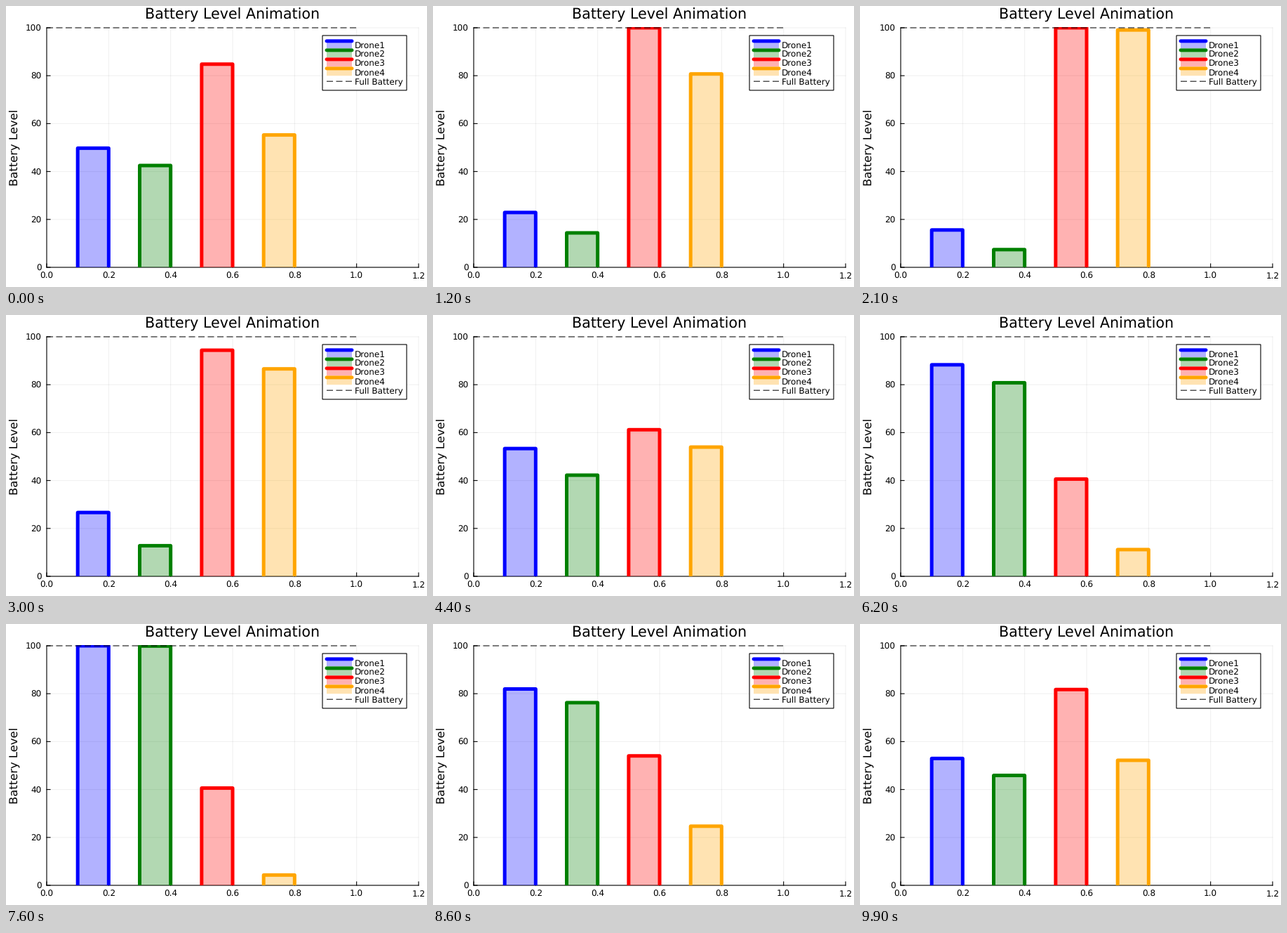
These frames come from a looping animation (600x400 px, 10000 ms). A matplotlib script:

```python
import matplotlib.pyplot as plt
import numpy as np
from matplotlib.animation import FuncAnimation
from matplotlib.patches import Rectangle

plt.rcParams["font.family"] = "DejaVu Sans"
plt.rcParams["text.hinting"] = "none"

W, H, DPI = 600, 400, 100
FRAMES, INTERVAL = 100, 100
PT = 72 / DPI  # points per pixel
LEFT, RIGHT, TOP, BOTTOM = 58, 588, 31, 372
PERIOD = 209   # simulation steps in one charge cycle

# name, colour, left edge, (step, level) corners of the charge cycle
DRONES = [
    ("Drone1", "blue", 0.1, [(31.8, 15.6), (50, 15.6), (141.7, 100), (162.2, 100)]),
    ("Drone2", "green", 0.3, [(31.2, 7.4), (56.7, 7.4), (147.9, 100), (157.9, 100)]),
    ("Drone3", "red", 0.5, [(14.8, 100), (57.1, 100), (109, 40.6), (165.9, 40.6)]),
    ("Drone4", "orange", 0.7, [(43.9, 100), (50.1, 100), (135.1, 4.3), (159, 4.3)]),
]

fig = plt.figure(figsize=(W / DPI, H / DPI), dpi=DPI, facecolor="white")
ax = fig.add_axes([0, 0, 1, 1])
ax.set_xlim(0, W)
ax.set_ylim(H, 0)
ax.axis("off")


def px(x):
    return LEFT + (RIGHT - LEFT) * x / 1.2


def py(level):
    return BOTTOM - (BOTTOM - TOP) * level / 100


def line(xs, ys, color="black", width=1.1, **kw):
    return ax.plot(xs, ys, color=color, lw=width * PT, snap=False, **kw)[0]


def box(x, y, w, h, **kw):
    return ax.add_patch(Rectangle((x, y), w, h, snap=False, **kw))


def label(x, y, s, size, **kw):
    ax.text(x, y, s, fontsize=size * PT, va="baseline", **kw)


def dashed(x0, x1, y, z):
    line([x0, x1], [y, y], width=1, dashes=(9, 4.5), dash_capstyle="butt",
         zorder=z)


def draw_axes():
    for i in range(7):
        x = px(i * 0.2)
        line([x, x], [TOP, BOTTOM], alpha=0.06, zorder=1)
        line([x, x], [BOTTOM, BOTTOM - 5], zorder=2)
        label(x, 388.1, f"{i * 0.2:.1f}", 12, ha="center")
    for level in range(0, 101, 20):
        y = py(level)
        line([LEFT, RIGHT], [y, y], alpha=0.06, zorder=1)
        line([LEFT, LEFT + 5], [y, y], zorder=2)
        label(50.7, y + 4.8, str(level), 12, ha="right")
    line([LEFT, LEFT, RIGHT], [TOP, BOTTOM, BOTTOM], zorder=2)
    label(323, 19, "Battery Level Animation", 20.6, ha="center")
    label(17.1, 201, "Battery Level", 16.4, ha="center", rotation=90,
          rotation_mode="anchor")
    dashed(LEFT, px(1), TOP, 5)


def draw_legend():
    box(451, 42, 120, 78, fc="white", ec="black", lw=1.1 * PT, zorder=6)
    for i, (name, color, _, _) in enumerate(DRONES):
        y = 49.9 + 13 * i
        box(457, y, 36, 10.4, fc=color, alpha=0.3, lw=0, zorder=7)
        line([457, 493], [y, y], color, 5, solid_capstyle="round", zorder=8)
        label(496.8, y + 9.5, name, 12, zorder=8)
    dashed(457, 493, 107.2, 8)
    label(496.8, 111.4, "Full Battery", 12, zorder=8)


draw_axes()
draw_legend()

plot_area = Rectangle((LEFT, TOP - 0.6), RIGHT - LEFT, BOTTOM - TOP + 0.6,
                      transform=ax.transData)
bars = []
for _, color, x, cycle in DRONES:
    x0, x1 = px(x), px(x + 0.1)
    fill = box(x0, BOTTOM, x1 - x0, 0, fc=color, alpha=0.3, lw=0, zorder=3)
    edge = line([x0, x0, x1, x1], [BOTTOM] * 4, color, 5, zorder=4,
                solid_joinstyle="round", solid_capstyle="butt")
    edge.set_clip_path(plot_area)
    bars.append((fill, edge, *zip(*cycle)))


def update(frame):
    step = frame * 25 // 12
    for fill, edge, steps, levels in bars:
        y = py(np.interp(step, steps, levels, period=PERIOD))
        fill.set_height(y - BOTTOM)
        edge.set_ydata([BOTTOM, y, y, BOTTOM])
    return [artist for bar in bars for artist in bar[:2]]


anim = FuncAnimation(fig, update, frames=FRAMES, interval=INTERVAL,
                     repeat=True, repeat_delay=0, blit=False)
plt.show()
```
